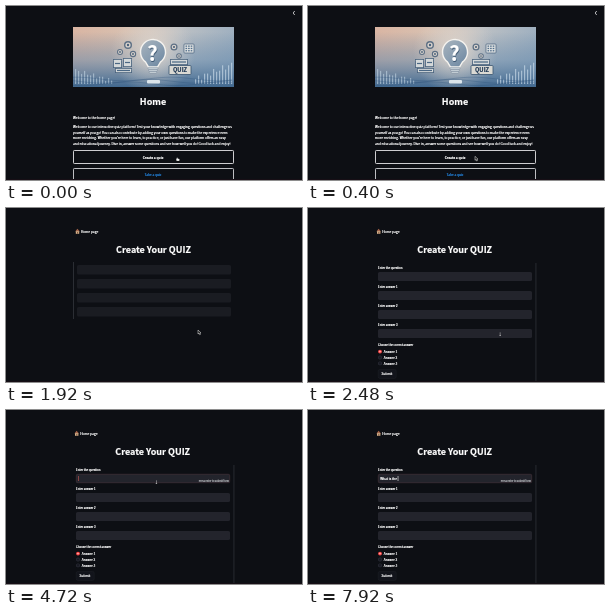
Animation, 296 px wide and 174 px high, one loop 8000 ms. Source, as an HTML page with a canvas:

```html
<!DOCTYPE html>
<html lang="en">
<head>
<meta charset="utf-8">
<title>Quiz builder</title>
<style>
html, body { margin: 0; width: 100%; height: 100%; overflow: hidden; background: #0d0f14; }
canvas { display: block; width: 296px; height: 174px; }
</style>
</head>
<body>
<canvas id="stage"></canvas>
<script>
const W = 296, H = 174, LOOP = 8000, STEP = 80;
const PAGE = 0.2273;            // page zoom on the stage
const FIT = 1 / 1.115;          // glyph scale of the chosen family
const FONT = '"Noto Sans CJK JP", "Noto Sans CJK SC", "Noto Sans CJK", "Open Sans", sans-serif';
const BG = '#0d0f14', INK = '#fff', FIELD = '#23242c', LINE = '#34363d';

const canvas = document.getElementById('stage');
const dpr = window.devicePixelRatio || 1;
canvas.width = W * dpr;
canvas.height = H * dpr;
const c = canvas.getContext('2d');

function rect(x, y, w, h, fill) {
  c.fillStyle = fill;
  c.fillRect(x, y, w, h);
}

function box(x, y, w, h, r, fill, stroke, lw = 0.5) {
  c.beginPath();
  c.roundRect(x, y, w, h, r);
  if (fill) { c.fillStyle = fill; c.fill(); }
  if (stroke) { c.strokeStyle = stroke; c.lineWidth = lw; c.stroke(); }
}

function disc(x, y, r, fill) {
  c.beginPath();
  c.arc(x, y, r, 0, Math.PI * 2);
  c.fillStyle = fill;
  c.fill();
}

function path(points, fill, stroke, lw = 0.5) {
  c.beginPath();
  points.forEach(([x, y], i) => i ? c.lineTo(x, y) : c.moveTo(x, y));
  if (fill) { c.closePath(); c.fillStyle = fill; c.fill(); }
  if (stroke) { c.strokeStyle = stroke; c.lineWidth = lw; c.stroke(); }
}

// size is in page pixels; returns the width on the stage
function text(str, x, y, size = 16, fill = INK, align = 'left', weight = 500) {
  c.save();
  c.translate(x, y);
  c.scale(PAGE, PAGE);
  c.font = `${weight} ${size * FIT}px ${FONT}`;
  c.textAlign = align;
  c.fillStyle = c.strokeStyle = fill;
  c.lineWidth = 0.9;            // keeps tiny type bright
  c.lineJoin = 'round';
  c.fillText(str, 0, 0);
  c.strokeText(str, 0, 0);
  const w = c.measureText(str).width * PAGE;
  c.restore();
  return w;
}

function gradient(x0, y0, x1, y1, ...colors) {
  const g = c.createLinearGradient(x0, y0, x1, y1);
  colors.forEach((color, i) => g.addColorStop(i / (colors.length - 1), color));
  return g;
}

function gear(x, y, r) {
  disc(x, y, r, '#5c6f84');
  disc(x, y, r * 0.65, '#d9d3cd');
  disc(x, y, r * 0.3, '#4a617a');
}

function card(x, y, w, h) {
  box(x, y, w, h, 0.8, '#3f5a76');
  box(x + 0.8, y + 0.8, w - 1.6, h - 1.6, 0.5, '#d5d9da');
  rect(x + 2, y + h / 2 - 0.6, w - 4, 1.2, '#4a6784');
}

function banner() {
  c.save();
  c.beginPath();
  c.rect(67, 21, 161, 60);
  c.clip();
  rect(67, 21, 161, 60, gradient(67, 21, 228, 21, '#d9b5a3', '#d8c0b0', '#bcc0c4', '#9fb0c0'));
  rect(67, 21, 161, 60, gradient(0, 26, 0, 81, 'rgba(82,122,162,0)', 'rgba(98,136,172,.5)', '#41688f'));
  const glow = c.createRadialGradient(147, 46, 4, 147, 46, 42);
  glow.addColorStop(0, 'rgba(238,224,210,.75)');
  glow.addColorStop(1, 'rgba(220,214,208,0)');
  rect(67, 21, 161, 60, glow);

  for (let i = 0; i < 13; i++) {
    const h = 5 + i * 1.2 + 3 * Math.sin(i * 2.3);
    rect(189 + i * 3, 78 - h, 1.2, h, 'rgba(205,222,236,.65)');
    rect(105 - i * 3, 78 - h * 0.7, 1.2, h * 0.7, 'rgba(205,222,236,.55)');
  }
  for (let k = 0; k < 3; k++) {
    const wave = [];
    for (let x = 67; x <= 228; x += 3)
      wave.push([x, 73 + k * 2.4 + Math.sin(x / 15 + k * 1.4) * 1.8]);
    path(wave, null, 'rgba(45,82,121,.5)', 0.6);
  }

  // scattered objects around the bulb
  gear(122, 39, 4);
  gear(114, 46, 3);
  gear(127, 48, 3.2);
  gear(168, 41, 3.5);
  gear(173, 50, 2.8);
  card(107, 53, 9, 9);
  card(117, 52, 9, 9);
  card(109, 62, 17, 5);
  box(178, 38, 10, 9, 0.8, '#dfe2e2', '#435e7a', 0.7);
  for (let i = 0; i < 9; i++)
    rect(179.5 + i % 3 * 2.6, 39.5 + Math.floor(i / 3) * 2.3, 1.6, 1.3, '#536f8b');
  card(164, 53, 18, 6);
  box(163, 59.5, 22, 9, 0.8, '#dad9d3', '#38536f', 0.8);
  text('QUIZ', 174, 66.4, 28, '#1f3854', 'center', 700);
  box(141, 74, 13, 3.4, 1, '#dce5eb');

  // bulb
  c.beginPath();
  c.arc(147, 46, 12.5, Math.PI * 0.7, Math.PI * 2.3);
  c.lineTo(151.5, 61);
  c.lineTo(142.5, 61);
  c.closePath();
  c.fillStyle = gradient(134, 34, 160, 62, '#a9b4bd', '#8a9eb1', '#66829d');
  c.fill();
  c.strokeStyle = '#f5f3ef';
  c.lineWidth = 1.4;
  c.stroke();
  for (let i = 0; i < 3; i++) box(142 + i * 0.6, 61.5 + i * 2, 10 - i * 1.2, 1.4, 0.7, '#dfe5e8', '#3c5671', 0.3);
  text('?', 147, 55.5, 100, '#3d5771', 'center', 700);
  text('?', 146.5, 55, 100, '#fff', 'center', 700);
  c.restore();
}

function homePage() {
  rect(0, 0, W, H, BG);
  path([[288.7, 5], [287.2, 7], [288.7, 9]], null, '#e8e8ea', 0.8);
  banner();
  text('Home', 147, 99.4, 44, INK, 'center', 700);
  text('Welcome to the home page!', 67, 112.7);
  [
    'Welcome to our interactive quiz platform! Test your knowledge with engaging questions and challenge us',
    'yourself as you go! You can also contribute by adding your own questions to make the experience even',
    'more enriching. Whether you\'re here to learn, to practice, or just have fun, our platform offers an easy',
    'and educational journey. Dive in, answer some questions and see how well you do! Good luck and enjoy!'
  ].forEach((line, i) => text(line, 67, 122.2 + i * 5.6));
  box(67.5, 144.5, 160, 13, 0.8, BG, '#e4e4e6', 0.9);
  text('Create a quiz', 147, 152.6, 16, INK, 'center', 700);
  box(67.5, 162.5, 160, 13, 0.8, BG, '#d2d3d6', 0.9);
  text('Take a quiz', 147, 169.8, 16, '#2385e0', 'center');
}

function quizHead(x) {
  path([[x + 2.2, 23.4], [x + 4.4, 20.8], [x + 6.8, 23.4]], '#a5644a');
  rect(x + 2.8, 23.2, 3.4, 2.6, '#d8b48c');
  rect(x + 4.2, 24, 0.9, 1.8, '#6d4634');
  text('Home page', x + 8, 24.9);
  text('Create Your QUIZ', x + 80.5, 44.5, 44, INK, 'center', 700);
}

const fieldTops = [64, 83, 102, 121];

function form() {
  rect(227.6, 55, 0.7, 119, LINE);
  ['Enter the question', 'Enter answer 1', 'Enter answer 2', 'Enter answer 3'].forEach((label, i) => {
    text(label, 70, fieldTops[i] - 2.7, 14);
    box(70, fieldTops[i], 154, 9, 1.6, FIELD);
  });
  text('Choose the correct answer', 70, 138.2, 14);
  for (let i = 0; i < 3; i++) {
    const y = 143.6 + i * 5.9;
    disc(72, y, 1.9, i ? '#30313b' : '#ff4b4b');
    disc(72, y, i ? 1.3 : 0.6, i ? '#171922' : INK);
    text('Answer ' + (i + 1), 75.7, y + 1.2);
  }
  box(70.2, 161.4, 18, 9, 1.6, '#12141b', '#24262d', 0.4);
  text('Submit', 79, 167.2, 16, INK, 'center');
}

// time at which each character of the question has arrived
const phrase = 'What is the ';
const keys = [5120, 5280, 5440, 5600, 5760, 6320, 6640, 6800, 7360, 7520, 7680, 7920];

// caret fades out from 3680, in from 4000, out again from 4720
function caretAlpha(t) {
  const ramp = (from, len) => Math.min(1, Math.max(0, (t - from) / len));
  if (t >= 4960) return 1;
  return 1 - ramp(3600, 240) + ramp(3920, 240) - ramp(4680, 120);
}

function focusField(t) {
  box(70.2, 64.2, 153.6, 8.6, 1.6, null, '#55353c', 0.4);
  text('Press Enter to submit form', 223, 71.9, 12, '#a9aaaf', 'right', 400);
  const typed = phrase.slice(0, keys.filter(k => t >= k).length);
  const w = text(typed, 72.2, 69.9);
  c.globalAlpha = caretAlpha(t);
  rect(72.2 + w, 66, 0.7, 5, typed ? '#d8d8da' : '#ff6a62');
  c.globalAlpha = 1;
}

// pointer path: time, x, y
const track = [
  [0, 170, 151.6], [240, 167, 150.3], [720, 167, 150.3], [880, 160, 147],
  [1040, 163, 141], [1280, 191, 120], [1440, 192, 122], [2400, 192, 122],
  [2480, 191.5, 124], [2880, 149.7, 70], [8000, 149.7, 70]
];

function pointerAt(t) {
  const i = track.findIndex(p => p[0] > t);
  const [t0, x0, y0] = track[i - 1], [t1, x1, y1] = track[i];
  const k = (t - t0) / (t1 - t0);
  return [x0 + (x1 - x0) * k, y0 + (y1 - y0) * k];
}

function pointer(t) {
  if (t >= 4960) return;
  const [x, y] = pointerAt(t);
  const inField = t >= 2080 && fieldTops.some(f => y + 2 > f && y + 2 < f + 9);
  c.save();
  c.translate(x, y);
  if (inField) {
    rect(0.3, 0.3, 0.6, 3.4, '#a8a8aa');
    rect(0, 3.3, 1.4, 0.6, '#dcdcdc');
  } else if (t < 240) {
    box(0.2, 1.2, 3.4, 2.2, 0.8, INK, '#111', 0.3);
    box(0.7, 0, 0.9, 2.4, 0.4, INK);
  } else {
    path([[0, 0], [0, 4], [1, 3.2], [1.7, 4.7], [2.4, 4.4], [1.8, 3], [3, 2.9], [0, 0]],
         '#161616', '#e8e8e8', 0.5);
  }
  c.restore();
}

function draw(t) {
  c.setTransform(dpr, 0, 0, dpr, 0, 0);
  if (t < 480) {
    homePage();
  } else {
    rect(0, 0, W, H, t < 1440 ? '#1b1b1b' : BG);
    if (t >= 2080) {
      quizHead(66.2);
      form();
    } else if (t >= 1840) {
      quizHead(67);
      rect(67, 54, 0.8, 57, LINE);
      if (t >= 1920)
        for (let i = 0; i < 4; i++) box(71, 57 + i * 14, 154, 9.6, 1.6, '#1a1c22');
    }
    if (t >= 3120) focusField(t);
  }
  rect(0, 173, W, 1, '#170f16');
  pointer(t);
}

const start = performance.now();
function tick() {
  const t = (performance.now() - start) % LOOP;
  draw(Math.floor(t / STEP) * STEP);
  requestAnimationFrame(tick);
}
tick();
</script>
</body>
</html>
```
